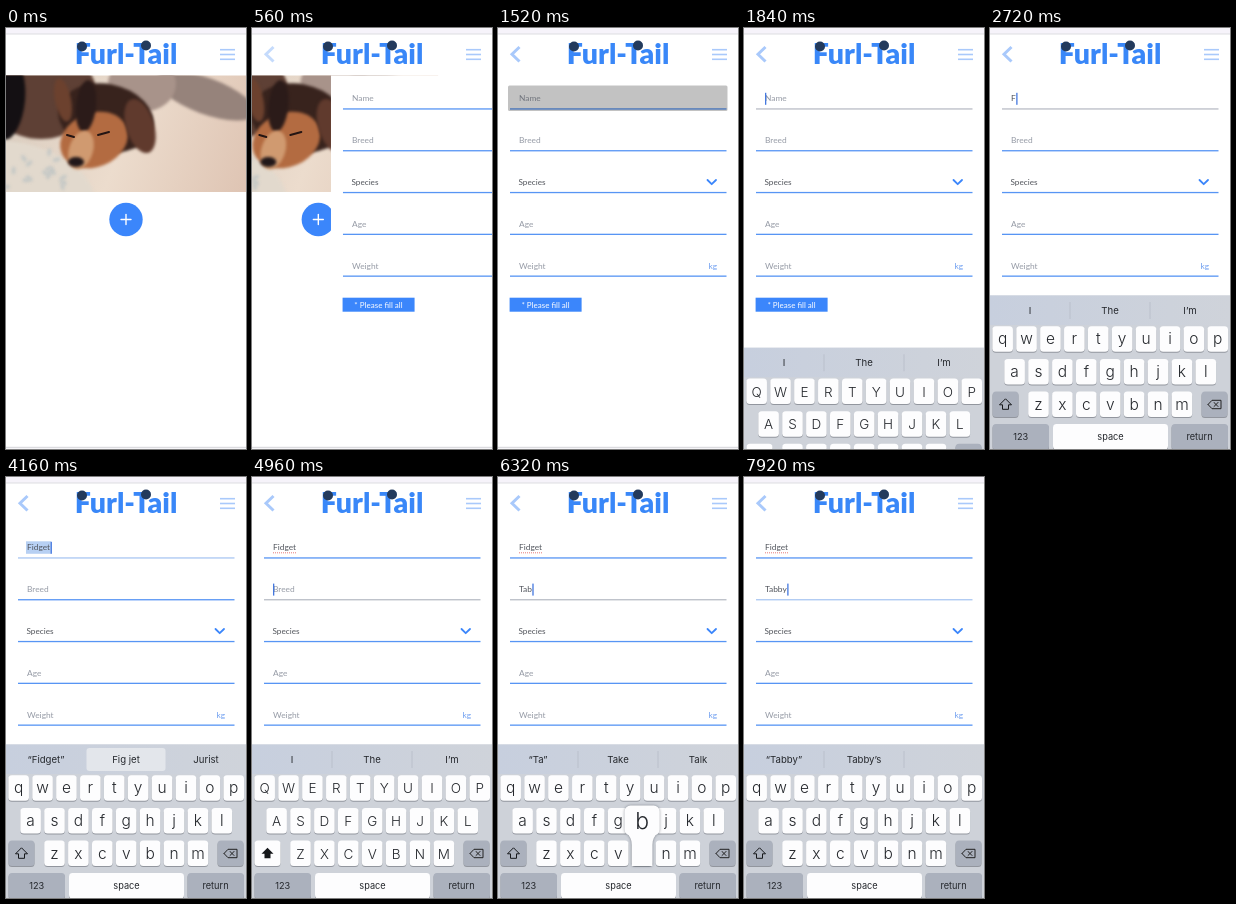
An HTML page with a canvas for the animation above (8 s loop, 240x421 px).

```html
<!DOCTYPE html>
<html lang="en">
<head>
<meta charset="utf-8">
<title>Pet profile form</title>
<style>
  html, body { margin: 0; width: 100%; height: 100%; overflow: hidden; background: #fff; }
  canvas { display: block; width: 240px; height: 421px; }
</style>
</head>
<body>
<canvas id="stage"></canvas>
<script>
const W = 240, H = 421, LOOP = 8000;
const BLUE = '#3b86fb', PALE = '#a9c9fb', GREY = '#abb1bd', WHITE = '#fdfdfe';
const BODY = 'Lato, sans-serif', KEYS = 'Inter, sans-serif';
const PUSH = 400, TAP = 1360, RISE = 1720, ACCEPT = 4360, NEXT = 4640;
const LAG = 100;

const canvas = document.getElementById('stage');
const ctx = canvas.getContext('2d');
const dpr = window.devicePixelRatio || 1;
canvas.width = W * dpr;
canvas.height = H * dpr;

// letters arrive one per step
const name = { word: 'Fidget', focus: RISE, start: 2660, step: 212, early: ['For', 'Find'], late: ['Fig jet', 'Jurist'] };
const breed = { word: 'Tabby', focus: NEXT, start: 5320, step: 480, early: ['Take', 'Talk'], late: ['Tabby’s', ''] };

const clamp = (v, lo = 0, hi = 1) => Math.max(lo, Math.min(hi, v));
const easeOut = v => 1 - Math.pow(1 - clamp(v), 3);
const count = (entry, t) => clamp(Math.floor((t - entry.start) / entry.step) + 1, 0, entry.word.length);
const typed = (entry, t) => entry.word.slice(0, count(entry, t));
const current = t => t < NEXT ? name : breed;
const correcting = t => count(name, t - LAG) === name.word.length && t < ACCEPT;

function rect(x, y, w, h, fill) {
  ctx.fillStyle = fill;
  ctx.fillRect(x, y, w, h);
}

function round(x, y, w, h, r, fill) {
  ctx.fillStyle = fill;
  ctx.beginPath();
  ctx.roundRect(x, y, w, h, r);
  ctx.fill();
}

function text(str, x, y, size, color, family = BODY, align = 'left', weight = 400) {
  ctx.font = `${weight} ${size}px ${family}`;
  ctx.fillStyle = color;
  ctx.textAlign = align;
  ctx.fillText(str, x, y);
}

function line(points, color, width, cap = 'round') {
  ctx.strokeStyle = color;
  ctx.lineWidth = width;
  ctx.lineCap = cap;
  ctx.lineJoin = cap === 'round' ? 'round' : 'miter';
  ctx.beginPath();
  points.forEach(p => ctx.lineTo(...p));
  ctx.stroke();
}

function oval(x, y, rx, ry, turn, fill) {
  ctx.fillStyle = fill;
  ctx.beginPath();
  ctx.ellipse(x, y, rx, ry, turn, 0, 7);
  ctx.fill();
}

const disc = (x, y, r, fill) => oval(x, y, r, r, 0, fill);

function seeded(seed) {
  return () => (seed = seed * 16807 % 2147483647) / 2147483647;
}

function photo() {
  ctx.save();
  ctx.beginPath();
  ctx.rect(0, 47.5, W, 116.5);
  ctx.clip();
  const bed = ctx.createLinearGradient(0, 60, W, 150);
  bed.addColorStop(0, '#d9ccbf');
  bed.addColorStop(.5, '#ecdccd');
  bed.addColorStop(1, '#dfc5b4');
  rect(0, 47, W, 118, bed);
  ctx.filter = `blur(${1.5 * dpr}px)`;
  oval(35, 65, 55, 46, 0, '#5e4035');
  oval(2, 72, 17, 40, .1, '#141013');
  oval(200, 68, 52, 18, .35, '#96837b');
  oval(136, 56, 34, 28, 0, '#a8938a');
  oval(20, 155, 70, 38, .3, '#e2d9cd');
  const rnd = seeded(7);
  for (let i = 0; i < 16; i++) oval(rnd() * 62, 122 + rnd() * 40, 4, 2, i, '#c6c9c6');
  oval(100, 90, 48, 34, .2, '#38231d');
  oval(88, 112, 35, 27, -.4, '#b36b41');
  oval(134, 98, 14, 28, -.3, '#603a2d');
  oval(57, 72, 8, 22, -.2, '#6c412e');
  oval(80, 78, 10, 26, .1, '#2b1b19');
  oval(75, 122, 12, 20, .3, '#d09a70');
  oval(70, 134, 8, 5, 0, '#211719');
  ctx.filter = 'none';
  line([[61, 107], [68, 109]], '#241513', 2);
  line([[92, 107], [103, 104]], '#241513', 2);
  ctx.restore();
}

function home() {
  photo();
  disc(120, 191.5, 16.7, BLUE);
  line([[115, 191.5], [125, 191.5]], '#fff', 1.4);
  line([[120, 186.5], [120, 196.5]], '#fff', 1.4);
}

function caret(x, y, t) {
  const entry = current(t), n = count(entry, t);
  const last = n ? entry.start + (n - 1) * entry.step : entry.focus;
  if ((t - last) % 1060 < 700) rect(x, y - 8.5, 1.3, 12, '#4478df');
}

const rowY = row => 73.3 + 41.8 * row;

function underline(row, color) {
  rect(12, rowY(row) + 7, 216.5, 1.3, color);
}

function input(label, row, entry, t) {
  const y = rowY(row), value = entry ? typed(entry, t) : '';
  const active = entry && t >= RISE && entry === current(t);
  underline(row, !active ? '#5795f4' : value.length > 3 ? '#aac7f2' : '#b9bdc6');
  ctx.font = `400 8.4px ${BODY}`;
  const width = value ? ctx.measureText(value).width : 0;
  if (entry === name && correcting(t)) rect(20, y - 9, width + 2, 12.5, '#b7d0f3');
  text(value || label, 21, y, 8.4, value ? '#50545c' : '#959aa5');
  if (entry === name && t >= ACCEPT) {
    for (let i = 0; i < width; i += 2) rect(21 + i, y + 2, 1, 1, '#e77b78');
  }
  if (active) caret(21 + width + (value ? .5 : 0), y, t);
}

function form(t) {
  rect(0, 47.5, W, 371, '#fff');
  input('Name', 0, name, t);
  input('Breed', 1, breed, t);
  underline(2, '#5795f4');
  text('Species', 20.5, rowY(2), 8.2, '#50535a');
  line([[209.5, 152], [213.7, 156.2], [218, 152]], BLUE, 1.8);
  input('Age', 3, null, t);
  input('Weight', 4, null, t);
  text('kg', 219, rowY(4), 8.4, '#6c9df0', BODY, 'right');
  rect(11.6, 269.7, 72, 14, BLUE);
  text('* Please fill all', 47.5, 279.8, 8, '#fff', BODY, 'center');
  if (t >= TAP && t < RISE) round(10, 57.5, 219.5, 25.5, 1.5, 'rgba(0,0,0,.24)');
}

function header(back) {
  rect(0, 0, W, 6, '#f6f3fa');
  rect(0, 5.5, W, 1, '#dedde2');
  text('Furl-Tail', 120, 36, 28.5, '#3987f8', BODY, 'center', 900);
  disc(76, 18.5, 5, '#233a5c');
  disc(140, 17.5, 5, '#233a5c');
  for (let y = 21.7; y < 32; y += 4.8) line([[214, y], [229, y]], PALE, 1.6, 'butt');
  ctx.globalAlpha = back;
  line([[21.5, 19], [14, 26.3], [21.5, 33.5]], PALE, 3, 'butt');
  ctx.globalAlpha = 1;
}

const rows = ['qwertyuiop', 'asdfghjkl', 'zxcvbnm'];
const STEP = 23.9;
const keyX = (row, i) => 120.2 + (i - (rows[row].length - 1) / 2) * STEP;
const keyY = row => 298.3 + 32.6 * row;

function key(x, row, w, fill) {
  round(x, keyY(row) + 1, w, 25.5, 3.5, '#92969e');
  round(x, keyY(row), w, 25.5, 3.5, fill);
}

function label(str, x, y, size, weight = 400) {
  text(str, x, y, size, '#24272c', KEYS, 'center', weight);
}

function popup(ch) {
  const row = rows.findIndex(r => r.includes(ch.toLowerCase()));
  const px = keyX(row, rows[row].indexOf(ch.toLowerCase())), y = keyY(row);
  const x = clamp(px, 19, W - 19);
  ctx.save();
  ctx.shadowColor = 'rgba(50,55,65,.5)';
  ctx.shadowBlur = 3 * dpr;
  ctx.fillStyle = WHITE;
  ctx.beginPath();
  ctx.roundRect(x - 17.5, y - 35, 35, 30, 6);
  ctx.moveTo(x - 16, y - 8);
  ctx.lineTo(x + 16, y - 8);
  ctx.quadraticCurveTo(px + 10.3, y - 3, px + 10.3, y + 4);
  ctx.lineTo(px + 10.3, y + 25.5);
  ctx.lineTo(px - 10.3, y + 25.5);
  ctx.lineTo(px - 10.3, y + 4);
  ctx.quadraticCurveTo(px - 10.3, y - 3, x - 16, y - 8);
  ctx.fill();
  ctx.restore();
  label(ch, x, y - 12, 23, 300);
}

function shiftIcon(on) {
  const half = [[0, -5.5], [6, .5], [3, .5], [3, 5]];
  const mirror = half.map(([x, y]) => [-x, y]).reverse();
  ctx.beginPath();
  [...half, ...mirror].forEach(([x, y]) => ctx.lineTo(15.5 + x, 376.3 + y));
  ctx.closePath();
  ctx.lineWidth = 1;
  ctx.fillStyle = ctx.strokeStyle = '#15171a';
  on ? ctx.fill() : ctx.stroke();
}

function deleteIcon() {
  line([[218, 376.5], [222, 372.3], [231, 372.3], [231, 380.7], [222, 380.7], [218, 376.5]], '#222', 1);
  line([[224, 374.5], [228, 378.5]], '#222', 1);
  line([[228, 374.5], [224, 378.5]], '#222', 1);
}

function suggestions(t) {
  const entry = current(t), part = typed(entry, t - LAG);
  if (!part || (entry === name && t >= ACCEPT)) return ['I', 'The', 'I’m'];
  return [`“${part}”`, ...(part.length < 4 ? entry.early : entry.late)];
}

function suggestionBar(t) {
  const tint = ctx.createLinearGradient(0, 0, W, 0);
  tint.addColorStop(0, '#c7cfde');
  tint.addColorStop(1, '#cfd3da');
  rect(0, 267.5, W, 29.5, tint);
  if (correcting(t)) round(80.5, 271, 79, 23, 3, '#e3e6eb');
  else [80, 160].forEach(x => rect(x - .4, 274, .8, 17, '#b6bcc8'));
  suggestions(t).forEach((word, i) => label(word, 40 + 80 * i, 286, 9.6));
}

function keyboard(t) {
  const entry = current(t), n = count(entry, t);
  const shift = n === 0 || (entry === name && t >= ACCEPT);
  rect(0, 267.5, W, 160, '#ced2d9');
  suggestionBar(t);
  rows.forEach((letters, row) => [...letters].forEach((ch, i) => {
    const x = keyX(row, i);
    key(x - 10.3, row, 20.6, WHITE);
    label(shift ? ch.toUpperCase() : ch, x, keyY(row) + 18, shift ? 13.5 : 15.5, 300);
  }));
  key(2.5, 2, 26, shift ? WHITE : GREY);
  key(211.5, 2, 26, GREY);
  shiftIcon(shift);
  deleteIcon();
  key(2.5, 3, 56.5, GREY);
  key(63, 3, 115, WHITE);
  key(181.5, 3, 56.5, GREY);
  label('123', 30.7, 412, 9.2);
  label('space', 120.5, 412, 9.2);
  label('return', 209.5, 412, 9.2);

  const held = t - entry.start - (n - 1) * entry.step;
  if (n && held < (n === 1 ? 40 : 90)) popup(entry.word[n - 1]);
}

function shifted(x, y, paint) {
  ctx.save();
  ctx.translate(x, y);
  paint();
  ctx.restore();
}

function draw(t) {
  ctx.setTransform(dpr, 0, 0, dpr, 0, 0);
  rect(0, 0, W, H, '#fff');
  const push = easeOut((t - PUSH) / 520);
  const rise = easeOut((t - RISE) / 400);
  if (push < 1) shifted(-80 * push, 0, home);
  if (push > 0) shifted(W * (1 - push), 0, () => form(t));
  header(push);
  rect(0, 419, W, 2, '#f6f5f8');
  rect(0, 418.8, W, 1, '#d5d5da');
  if (rise > 0) shifted(0, 154 * (1 - rise), () => keyboard(t));
}

const begin = performance.now();
function tick() {
  draw((performance.now() - begin) % LOOP);
  requestAnimationFrame(tick);
}
tick();
</script>
</body>
</html>
```
